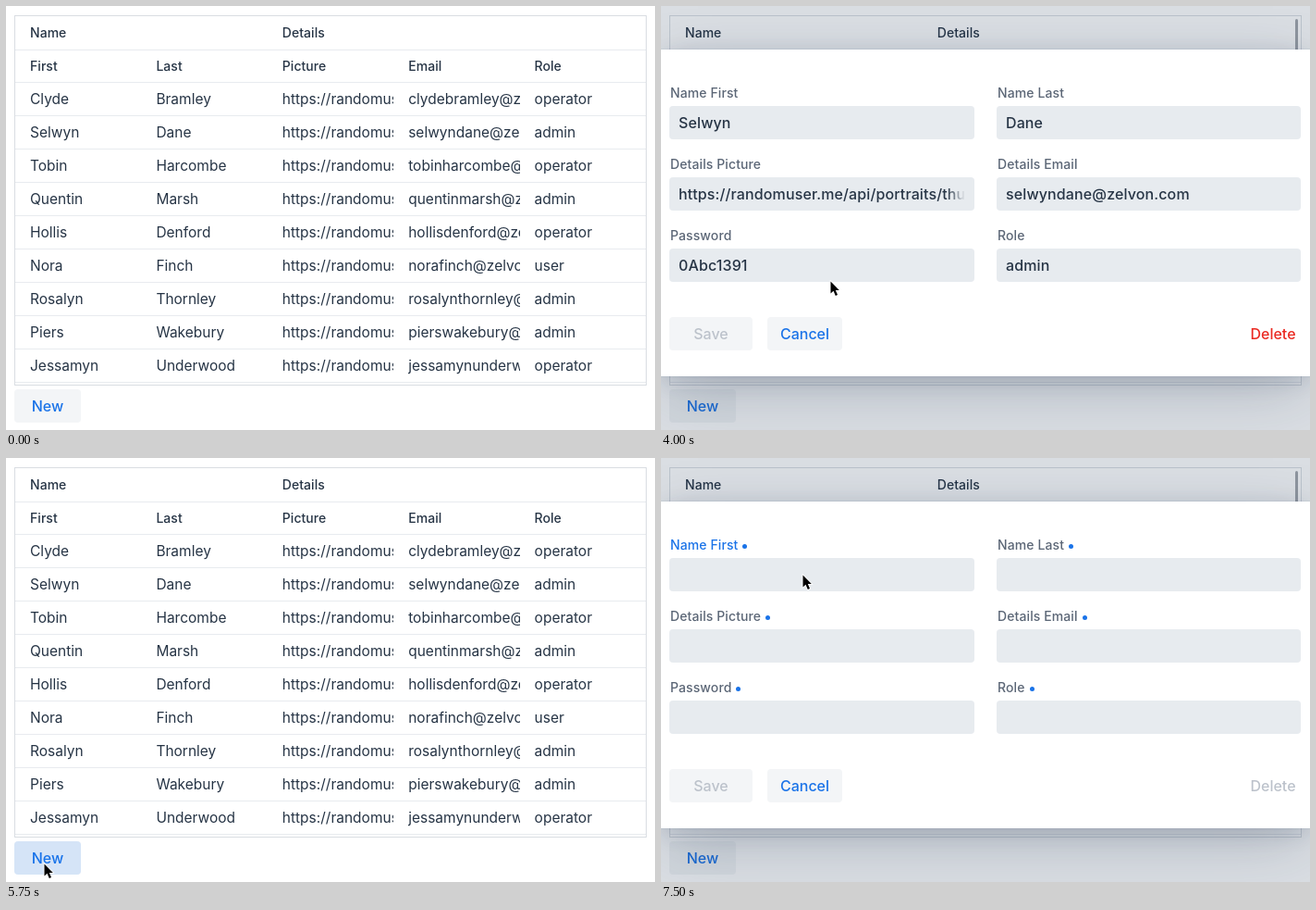
Recreate the animation shown at these times as an HTML page. Size 702x458 px, loop 8 s.

```html
<!DOCTYPE html>
<html lang="en">
<head>
<meta charset="utf-8">
<title>Grid with edit dialog</title>
<style>
:root {
  --text: #263445;
  --label: #5b6676;
  --primary: #1a73e8;
  --shade-5: rgba(26, 57, 96, .05);
  --shade-10: rgba(26, 57, 96, .1);
}
* { box-sizing: border-box; }
html, body { margin: 0; width: 100%; height: 100%; overflow: hidden; background: #fff; }
body { font: 400 15.5px Inter, Roboto, sans-serif; color: var(--text); }
#stage { position: absolute; left: 0; top: 0; width: 702px; height: 458px; overflow: hidden; }
#stage * { position: absolute; white-space: nowrap; }

.grid { left: 9px; top: 10px; width: 684px; height: 400px; border: 1px solid #d9dde2; }
.row { left: 0; width: 682px; height: 36px; border-top: 1px solid #e8ebef; line-height: 35px; }
.row span { top: 0; width: 120.4px; height: 35px; overflow: hidden; }
.head { font-weight: 500; font-size: 14px; letter-spacing: .05px; line-height: 33px; }
.head.top { border-top-color: transparent; line-height: 35px; }
.scroll { left: 686px; top: 14px; width: 3px; height: 36px; border-radius: 2px; background: #a3a7ad; }

.button {
  height: 36px; border-radius: 4px; background: var(--shade-5); color: var(--primary);
  font-weight: 500; font-size: 16px; line-height: 36px; text-align: center;
}
.button.disabled { color: #bcc2cb; }
.button.plain { background: none; }
.button.danger { color: #ea2a22; }
.hover::after {
  content: ""; position: absolute; inset: 0; border-radius: 4px;
  background: rgba(22, 118, 243, .13); opacity: 0;
}

.backdrop { inset: 0; background: rgb(30, 52, 82); }
.dialog {
  left: 0; top: 47px; width: 702px; height: 353px; background: #fff;
  transform: scale(var(--grow, 1)); transform-origin: 351px 177px;
  box-shadow: 0 0 0 1px var(--shade-5), 0 4px 24px -3px rgba(30, 52, 82, .2),
    0 18px 64px -8px rgba(30, 48, 75, .26);
}
.label { height: 20px; line-height: 20px; font-weight: 500; font-size: 14px; letter-spacing: .1px; color: var(--label); }
.required::after {
  content: ""; position: absolute; left: calc(100% + 5px); top: 8.5px;
  width: 5px; height: 5px; border-radius: 50%; background: var(--primary);
}
.field {
  height: 36px; border-radius: 4px; background: var(--shade-10);
  font-weight: 500; font-size: 16px; letter-spacing: .12px; line-height: 36px;
}
.field span {
  left: 10px; right: 10px; height: 36px; overflow: hidden;
  -webkit-mask-image: linear-gradient(to left, transparent, #000 20px);
  mask-image: linear-gradient(to left, transparent, #000 20px);
}
.cursor { left: -1px; top: -2px; width: 14px; height: 20px; }

/* everything moves on a 250 ms beat of an 8 s loop */
.backdrop, .scroll, .dialog, .cursor, .hover::after, .focus { animation: 8s step-end infinite; }
.backdrop { animation-name: backdrop; }
.scroll { animation-name: scroll; }
.edit { animation-name: edit; }
.create { animation-name: create; }
.cursor { animation-name: cursor; }
.focus { animation-name: focus; }
.edit .hover::after { animation-name: hover-cancel; }
.new::after { animation-name: hover-new; }

@keyframes backdrop {
  0%, 62.5% { opacity: 0; }
  34.375% { opacity: .13; }
  37.5% { opacity: .16; }
  75% { opacity: .1; }
  78.125% { opacity: .145; }
  81.25%, 100% { opacity: .16; }
}
@keyframes scroll {
  0%, 62.5% { opacity: 0; }
  34.375%, 75%, 100% { opacity: 1; }
}
/* the scale goes through a variable so that text stays sharp at rest */
@keyframes edit {
  0%, 62.5%, 100% { opacity: 0; --grow: 1; }
  34.375% { opacity: 1; --grow: 1; }
  59.375% { opacity: .82; --grow: 1.003; }
}
@keyframes create {
  0% { opacity: 0; }
  75%, 100% { opacity: 1; }
}
@keyframes hover-cancel {
  0%, 62.5%, 100% { opacity: 0; }
  56.25% { opacity: 1; }
}
@keyframes hover-new {
  0%, 81.25%, 100% { opacity: 0; }
  71.875% { opacity: 1; }
}
@keyframes focus {
  0% { color: var(--label); }
  87.5%, 100% { color: var(--primary); }
}
@keyframes cursor {
  0% { transform: translate(-40px, 0); }
  9.375% { transform: translate(317px, 63px); }
  12.5% { transform: translate(292px, 32px); }
  18.75% { transform: translate(291px, 39px); }
  21.875% { transform: translate(279px, 147px); }
  25% { transform: translate(275px, 142px); }
  50% { transform: translate(183px, 298px); }
  53.125% { transform: translate(165px, 354px); }
  56.25% { transform: translate(162px, 356px); }
  65.625% { transform: translate(55px, 428px); }
  68.75% { transform: translate(32px, 440px); }
  71.875% { transform: translate(41px, 439px); }
  81.25% { transform: translate(131px, 167px); }
  84.375%, 100% { transform: translate(153px, 127px); }
}
</style>
</head>
<body>
<div id="stage"></div>
<script>
const people = [
  ['Clyde', 'Bramley', 'operator'],
  ['Selwyn', 'Dane', 'admin'],
  ['Tobin', 'Harcombe', 'operator'],
  ['Quentin', 'Marsh', 'admin'],
  ['Hollis', 'Denford', 'operator'],
  ['Nora', 'Finch', 'user'],
  ['Rosalyn', 'Thornley', 'admin'],
  ['Piers', 'Wakebury', 'admin'],
  ['Jessamyn', 'Underwood', 'operator'],
];
const picture = 'https://randomuser.me/api/portraits/thu';
const email = (first, last) => `${first}${last}@zelvon.com`.toLowerCase();

const row = (top, cells, kind = '') => `<div class="row ${kind}" style="top:${top}px">` +
  cells.map((text, i) => `<span style="left:${16 + i * 136.4}px">${text}</span>`).join('') + '</div>';

const button = (text, left, top, width, kind = '') =>
  `<div class="button ${kind}" style="left:${left}px;top:${top}px;width:${width}px">${text}</div>`;

function grid() {
  const rows = people.map(([first, last, role], i) =>
    row(71 + i * 36, [first, last, picture, email(first, last), role]));
  return '<div class="grid">' +
    row(-1, ['Name', '', 'Details'], 'head top') +
    row(36, ['First', 'Last', 'Picture', 'Email', 'Role'], 'head') +
    rows.join('') + '<div class="row" style="top:395px;height:1px"></div></div>';
}

function dialog(kind, values) {
  const isNew = !values;
  const labels = ['Name First', 'Name Last', 'Details Picture', 'Details Email', 'Password', 'Role'];
  const fields = labels.map((label, i) => {
    const left = i % 2 ? 363 : 9;
    const top = 61 + Math.floor(i / 2) * 77;
    const state = isNew ? 'required' + (i ? '' : ' focus') : '';
    return `<div class="label ${state}" style="left:${left + 1}px;top:${top - 24}px">${label}</div>` +
      `<div class="field" style="left:${left}px;top:${top}px;width:${i % 2 ? 329 : 330}px">` +
      `<span>${isNew ? '' : values[i]}</span></div>`;
  });
  return `<div class="dialog ${kind}">` + fields.join('') +
    button('Save', 9, 289, 90, 'disabled') +
    button('Cancel', 115, 289, 81, isNew ? '' : 'hover') +
    button('Delete', 622, 289, 80, 'plain ' + (isNew ? 'disabled' : 'danger')) + '</div>';
}

const [first, last, role] = people[1];
document.getElementById('stage').innerHTML =
  grid() +
  '<div class="scroll"></div>' +
  button('New', 9, 414, 72, 'hover new') +
  '<div class="backdrop"></div>' +
  dialog('edit', [first, last, picture, email(first, last), '0Abc1391', role]) +
  dialog('create') +
  `<svg class="cursor" viewBox="0 0 14 20"><path d="M1.5 1.5V14.5L4.5 11.8L6.8 17L9 16
    L6.8 11H10.8Z" stroke="#fff" stroke-width="1.6" paint-order="stroke"/></svg>`;
</script>
</body>
</html>
```
